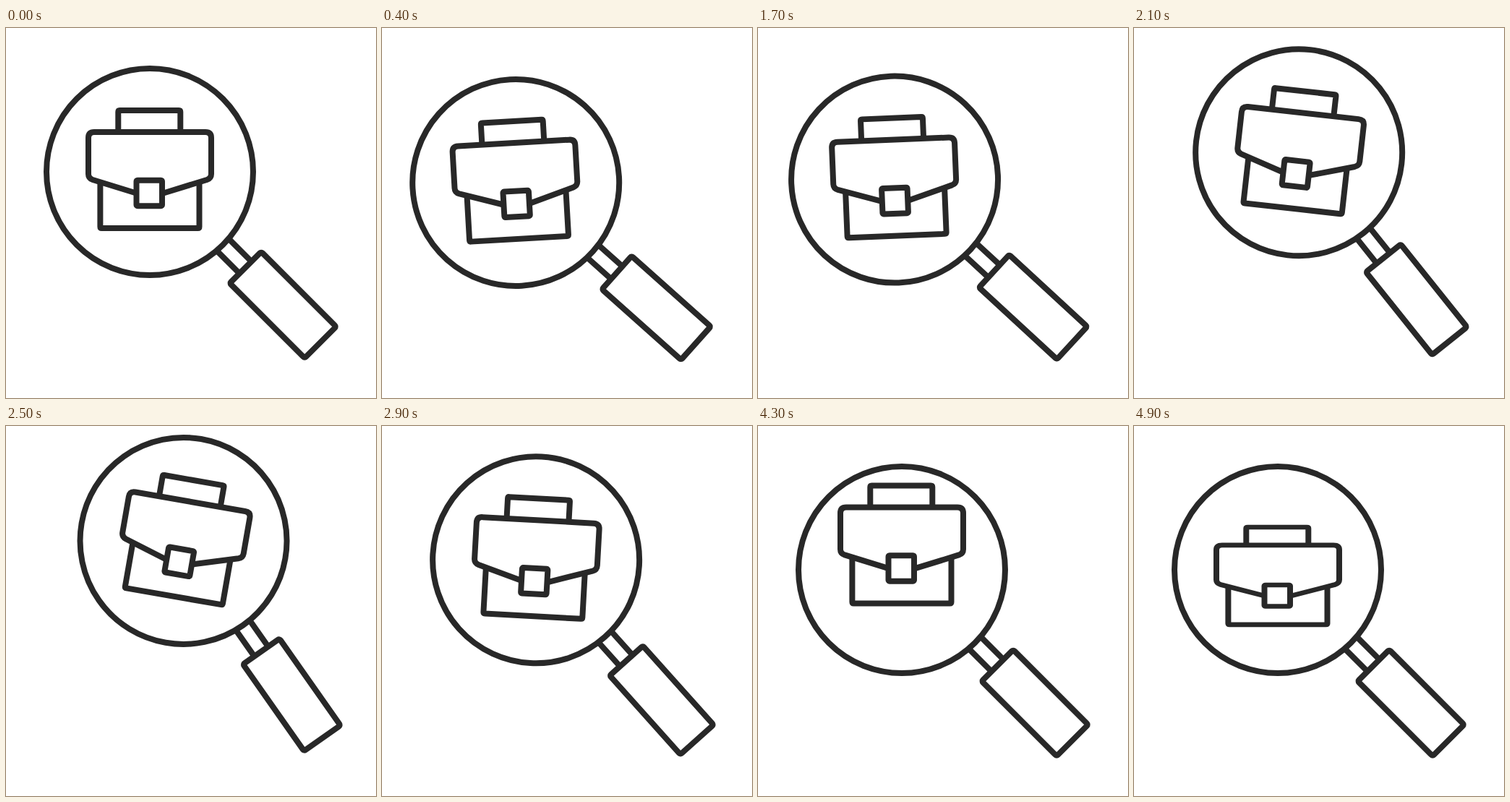
Write an HTML page that moves like this. It is 512 by 512 pixels and loops after 5000 ms.

```html
<!DOCTYPE html>
<html lang="en">
<head>
<meta charset="utf-8">
<title>Job search</title>
<style>
  html, body { margin: 0; width: 100%; height: 100%; overflow: hidden; background: #fff; }
  svg { display: block; width: 100%; height: 100%; }
</style>
</head>
<body>
<svg viewBox="0 0 512 512" fill="none" stroke="#282828" stroke-width="8" stroke-linejoin="round">
  <g id="glass">
    <circle cx="199" cy="199" r="143"/>
    <g transform="translate(199 199) rotate(45)">
      <path d="M143-11.7H187M143 11.7H187"/>
      <rect x="187.2" y="-30.8" width="146.600" height="61.600" rx="2.5"/>
    </g>
    <g id="bag">
      <path d="M155.300 144V116Q155.300 114 157.300 114H239.300Q241.300 114 241.300 116V144"/>
      <path d="M130.400 212V275Q130.400 277 132.400 277H265.500Q267.500 277 267.500 275V212"/>
      <path d="M180 228.500L120 210Q114 208 114 202V152Q114 144 122 144H276Q284 144 284 152V202Q284 208 278 210L218 228.500"/>
      <rect x="180.500" y="210.700" width="35.500" height="35.500" rx="1.500"/>
    </g>
  </g>
</svg>
<script>
const LOOP = 5000, STEP = 100, PIVOT = "454 448", FLOOR = 281;
const glass = document.getElementById("glass");
const bag = document.getElementById("bag");

const progress = (t, from, to) => Math.min(1, Math.max(0, (t - from) / (to - from)));
const ease = (t, from, to) => {
  const u = progress(t, from, to);
  return u * u * (3 - 2 * u);
};

// The first swing is only lightly eased.
const firstSwing = t => 0.7 * progress(t, 0, 1150) + 0.3 * ease(t, 0, 1150);

function draw(now) {
  const t = Math.floor((now % LOOP) / STEP) * STEP;
  const angle = -10 * firstSwing(t) + 20 * ease(t, 1150, 2455) - 10 * ease(t, 2455, 3167);
  const lift = 32 * (ease(t, 4245, 5045) - ease(t, 3167, 4245));
  const squash = 1 - 0.23 * ease(t, 4600, 5045);

  glass.setAttribute("transform", `rotate(${angle} ${PIVOT})`);
  bag.setAttribute("transform",
    `translate(0 ${FLOOR + lift}) scale(1 ${squash}) translate(0 ${-FLOOR})`);
}

const start = performance.now();
function tick() {
  draw(performance.now() - start);
  requestAnimationFrame(tick);
}
tick();
</script>
</body>
</html>
```
